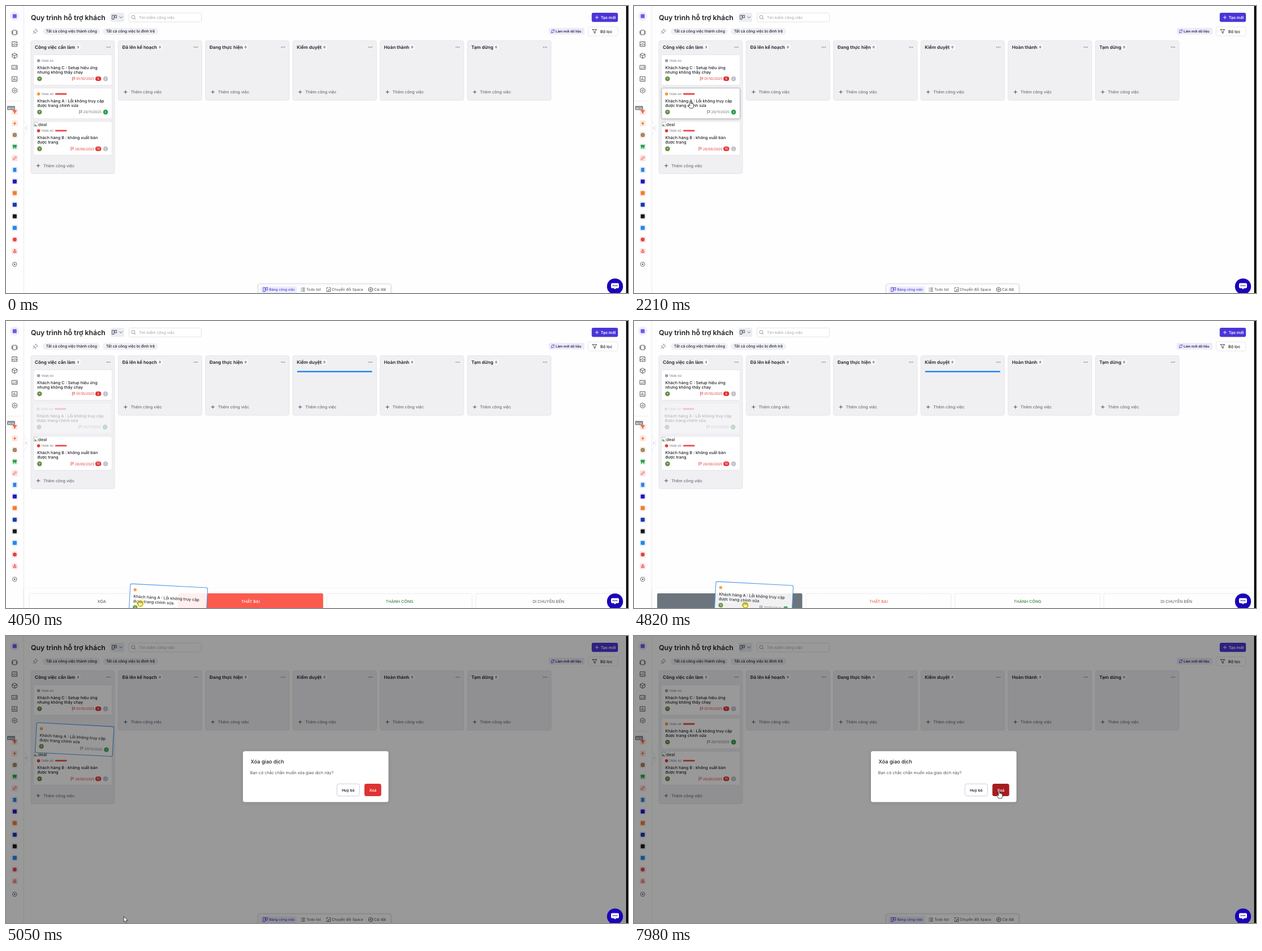
These frames come from a looping animation (1100x509 px, 8000 ms). An HTML page with a canvas:

```html
<!DOCTYPE html>
<html lang="vi">
<head>
<meta charset="utf-8">
<title>Kanban</title>
<style>
html, body { margin: 0; width: 100%; height: 100%; overflow: hidden; background: #fefefe; }
canvas { display: block; }
</style>
</head>
<body>
<canvas id="stage" width="1100" height="509"></canvas>
<script>
const ctx = document.getElementById('stage').getContext('2d');
const LOOP = 8000, GRAB = 2540, DROP = 4850, HOME = 5300;
const INK = '#1d1f24', GREY = '#6d7077', VIOLET = '#4b38d8', RED = '#e03232', CHAT = '#1a05b9';
const TILT = Math.PI / 60;

const clamp = v => Math.max(0, Math.min(1, v));
const ramp = (t, from, length) => clamp((t - from) / length);

// Smooth path through [time, x, y] points.
function along(points, t) {
  let i = 0;
  while (i < points.length - 2 && t >= points[i + 1][0]) i++;
  const a = points[i], b = points[i + 1];
  const before = points[i - 1] || a, after = points[i + 2] || b;
  const span = b[0] - a[0], u = clamp((t - a[0]) / span);
  return [1, 2].map(k => {
    const m0 = i ? (b[k] - before[k]) / (b[0] - before[0]) * span : 0;
    const m1 = after === b ? 0 : (after[k] - a[k]) / (after[0] - a[0]) * span;
    return a[k] + u * m0 + u * u * (3 * (b[k] - a[k]) - 2 * m0 - m1)
      + u * u * u * (2 * (a[k] - b[k]) + m0 + m1);
  });
}

const CURSOR = [
  [250, 1075, 498], [480, 880, 400], [760, 430, 250], [1020, 197, 184], [1250, 150, 152],
  [1500, 96, 205], [1720, 112, 238], [1930, 104, 220], [2210, 99.5, 169], [GRAB, 99.5, 170],
  [2680, 76, 200], [2850, 300, 288], [3020, 529, 356], [3250, 580, 390], [3450, 588, 425],
  [3650, 530, 460], [3850, 390, 492], [4050, 238, 501], [4250, 197, 504], [DROP, 197, 504],
  [4910, 198, 504], [5050, 208, 498], [5300, 350, 430], [5560, 590, 350], [5850, 644, 321],
  [6150, 648, 277], [6600, 647, 274], [6720, 642, 274], [6930, 604, 273], [7140, 604, 275],
  [7400, 643, 274], [7640, 646, 276], [7840, 646, 275], [7980, 645.5, 275.5]
];
const DRAG = [
  [GRAB, 118, 172.7], [2690, 92, 186], [2850, 262, 245], [3020, 512, 315], [3250, 567, 368],
  [3450, 581, 412], [3650, 556, 448], [3850, 440, 480], [4050, 287.5, 496], [4250, 224, 499],
  [DROP, 212, 492]
];

function text(str, x, cy, size, color = INK, weight = 400, align = 'left') {
  ctx.font = `${weight} ${size}px Inter, sans-serif`;
  ctx.textAlign = align;
  ctx.fillStyle = color;
  ctx.fillText(str, x, cy + size * 0.364);
  return ctx.measureText(str).width;
}

function box(x, y, w, h, r, fill, stroke, width = 0.8) {
  ctx.beginPath();
  ctx.roundRect(x, y, w, h, r);
  if (fill) { ctx.fillStyle = fill; ctx.fill(); }
  if (stroke) { ctx.strokeStyle = stroke; ctx.lineWidth = width; ctx.stroke(); }
}

function disc(x, y, r, fill, stroke, width = 0.8) {
  box(x - r, y - r, 2 * r, 2 * r, r, fill, stroke, width);
}

function path(x, y, d, stroke, width = 0.9, fill) {
  const shape = new Path2D(d);
  ctx.save();
  ctx.translate(x, y);
  if (fill) { ctx.fillStyle = fill; ctx.fill(shape); }
  if (stroke) {
    ctx.strokeStyle = stroke;
    ctx.lineWidth = width;
    ctx.lineJoin = ctx.lineCap = 'round';
    ctx.stroke(shape);
  }
  ctx.restore();
}

function shadow(blur, color, draw) {
  ctx.save();
  ctx.shadowBlur = blur;
  ctx.shadowColor = color;
  ctx.shadowOffsetY = 0.6;
  draw();
  ctx.restore();
}

const plus = (x, y, color, r = 2.7) => path(x, y, `M${-r} 0H${r}M0 ${-r}V${r}`, color, 0.9);
const boardIcon = (x, y, color) => path(x, y, 'M-3.8-3.6H-.8V3.6H-3.8ZM1-3.6H3.8V1H1Z', color, 0.9);
const gear = (x, y, color, s = 1) => {
  path(x, y, `M0 ${-4.5 * s}L${4 * s} ${-2.3 * s}V${2.3 * s}L0 ${4.5 * s}L${-4 * s} ${2.3 * s}V${-2.3 * s}Z`, color);
  disc(x, y, 1.5 * s, null, color);
};

const MENU = [
  'M-3-4H3V4H-3ZM-4.7-2.5V2.5M4.7-2.5V2.5',
  'M-4.2-4.2H4.2V4.2H-4.2ZM-4.2 1H-1.5L0 2.3 1.5 1H4.2M-1.5-1.7L0-.3 2-2.5',
  'M0-4.5L4.3-2.2V2.3L0 4.6-4.3 2.3V-2.2ZM-4.3-2.2L0 0 4.3-2.2M0 0V4.6',
  'M-4.6-3.5H4.6V3.5H-4.6ZM-3 1.7Q-1.5-.2 0 1.7M1.5-1H3.2M1.5 1H3.2M-1.5-1.5V-1',
  'M-4.2-4.2H4.2V4.2H-4.2ZM-2 2V-.5M0 2V-2M2 2V.7'
];
const APPS = [
  ['#fde7de', '#ee5a36', 'M-3.2-2.8H3.2V-.6H1.2V3H-1.2V-.6H-3.2Z'],
  ['#fde9de', '#f06a34', 'M.8-3.8L-2.8.7H-.3L-.9 3.8 2.8-.8H.3Z'],
  ['#f8eadb', '#77502b', 'globe'],
  ['#dff3e3', '#2b9a4b', 'M-3.5-3.2H3.5V0H2.8V3.3H.9V1H-.9V3.3H-2.8V0H-3.5Z'],
  ['#fde3e1', '#e95c52', 'link'],
  ['#deecfc', '#3181df', 'M-2.8-3.6H2.8V3.6H-2.8Z'],
  ['#e1e2fb', '#2515bd', 'square'],
  ['#fde6d8', '#ee7e37', 'square'],
  ['#dfe4fa', '#1e3ba5', 'square'],
  ['#e5e5e7', '#17181b', 'square'],
  ['#dcecfd', '#2b88e5', 'square'],
  ['#fde2e1', '#de4442', 'disc'],
  ['#fde6e6', '#e95151', 'M-1.3-3.2H1.3V-.9H-1.3ZM-3.6-.3H3.6V.6H-3.6ZM-2.8 1.4H2.8V3H-2.8Z']
];

function sidebar() {
  ctx.fillStyle = '#e7e8ec';
  ctx.fillRect(31, 0, 0.9, 509);
  disc(15.3, 18, 8, '#eeedf8');
  box(11.8, 14.5, 7, 7, 1, '#7158e8');
  MENU.forEach((d, i) => path(15.3, 47 + i * 20.6, d, '#44484f', 0.9));
  gear(15.3, 150, '#44484f');
  ctx.fillStyle = '#e7e8ec';
  ctx.fillRect(0, 168.5, 27, 0.8);
  APPS.forEach(([tint, color, shape], i) => {
    const y = 187.6 + i * 20.6;
    box(10, y - 5.4, 10.8, 10.8, 2.5, tint);
    if (shape === 'square') box(11.9, y - 3.5, 7, 7, 1.3, color);
    else if (shape === 'disc') disc(15.4, y, 3.4, color);
    else if (shape === 'globe') {
      disc(15.4, y, 3.5, color);
      path(15.4, y, 'M-3-1H3M-3 1H3M-1-3V3M1-3V3', tint, 0.45);
    } else if (shape === 'link') {
      path(15.4, y, 'M-.3-1.6L1-2.9Q3.3-3 3 -.8L1.6.5M.3 1.6L-1 2.9Q-3.3 3-3 .8L-1.6-.5M-1 1L1-1', color);
    } else path(15.4, y, shape, null, 0, color);
  });
  box(2, 177.3, 14, 7.2, 1, '#858a91');
  text('BETA', 9, 181, 4.2, '#fff', 600, 'center');
  disc(15.3, 458, 3.8, null, '#44484f');
  disc(15.3, 458, 1.2, '#44484f');
  path(32, 216.5, 'M0-12Q1-8 4-7Q6-6 6-3V3Q6 6 4 7Q1 8 0 12', '#e7e8ec', 0.8, '#fff');
  path(35, 216.5, 'M-.8-1.8L.9 0-.8 1.8', '#8b8f97', 0.7);
}

function header() {
  text('Quy trình hỗ trợ khách', 43.9, 20.3, 12.3, INK, 600);
  box(185, 12, 24, 16.3, 3, '#ecedf3');
  boardIcon(191.8, 20, '#3b4050');
  path(203.3, 20, 'M-2.5-1.2L0 1.3 2.5-1.2', '#555b68');
  box(217.5, 12.3, 128, 16, 3, '#fff', '#dadce2');
  disc(225, 19.6, 3, null, '#7d828a');
  path(227.2, 21.8, 'M0 0L1.8 1.8', '#7d828a');
  text('Tìm kiếm công việc', 235, 20.4, 6.9, '#a0a3aa');
  box(1035.8, 12, 46.4, 16.2, 3, '#4a35d7');
  plus(1045, 20.2, '#fff');
  text('Tạo mới', 1051.7, 20.4, 7, '#fff', 600);

  path(52, 45, 'M.6-4L4-.6 2.6-.2.6 1.8.2 3.6-3.6-.2-1.8-.6.2-2.6ZM-1.7 1.7L-4 4', '#666b74', 0.8);
  box(65, 39, 101, 12, 6, '#efeff6');
  text('Tất cả công việc thành công', 70.8, 45, 6.68, INK, 500);
  box(171, 39, 98, 12, 6, '#efeff6');
  text('Tất cả công việc bị đình trệ', 177, 45, 6.68, INK, 500);
  box(960, 38.8, 63, 11.8, 2, '#ecebf8');
  path(967, 44.8, 'M-2.6-.4A2.7 2.7 0 0 1 2.2-1.5M2.4-3V-1.4H.8M2.6.4A2.7 2.7 0 0 1-2.2 1.5M-2.4 3V1.4H-.8', VIOLET, 0.8);
  text('Làm mới dữ liệu', 972, 44.8, 6, '#272151', 600);
  box(1029.5, 37, 52.5, 16, 3, '#fff', '#dfe1e6');
  path(1041, 45, 'M-3.7-3.4H3.7L1 .1V3.4L-1 2.5V.1Z', '#30343b', 0.9);
  text('Bộ lọc', 1051, 45, 7.22, INK, 500);
}

const COLUMNS = ['Công việc cần làm', 'Đã lên kế hoạch', 'Đang thực hiện', 'Kiểm duyệt', 'Hoàn thành', 'Tạm dừng'];
const columnX = i => 44 + i * 154.4;

function columns() {
  COLUMNS.forEach((name, i) => {
    const x = columnX(i), foot = i ? 152.5 : 283.2;
    box(x, 61.6, 148, i ? 105.6 : 235.8, 3, '#f0f0f3', '#e0e1e5');
    const end = x + 7 + text(name, x + 7, 73, 8.02, INK, 600);
    disc(end + 5.2, 72.8, 4.6, '#fff');
    text(i ? '0' : '3', end + 5.2, 72.8, 5.8, INK, 500, 'center');
    for (let k = -1; k <= 1; k++) disc(x + 137.2 + k * 2.7, 73, 0.7, '#3c4048');
    plus(x + 13, foot, '#3c4048');
    text('Thêm công việc', x + 22, foot, 7.22, GREY, 500);
  });
}

const CARDS = [
  { top: 86.5, h: 54, task: 'TASK-43', dot: '#9da0a6', lines: ['Khách hàng C : Setup hiệu ứng', 'nhưng không thấy chạy'], date: '01/10/2025', late: '5' },
  { top: 145.5, h: 54.4, task: 'TASK-40', dot: '#f39a36', bar: true, lines: ['Khách hàng A : Lỗi không truy cập', 'được trang chỉnh sửa'], date: '20/11/2025' },
  { top: 204.7, h: 60, task: 'TASK-42', dot: '#e83b3b', bar: true, alt: true, lines: ['Khách hàng B : không xuất bản', 'được trang'], date: '26/09/2025', late: '10' }
];
const CARD_X = 48.6, CARD_W = 139;

function cardBody(card, lifted) {
  const shift = card.alt ? 6 : 0, foot = 42.6 + shift;
  disc(9, 10.5 + shift, 2.8, card.dot);
  if (!lifted) {
    text(card.task, 13.7, 10.6 + shift, 5, '#85888f', 600);
    if (card.bar) box(38.3, 9.1 + shift, 20.6, 2.8, 1.4, '#ef4747');
  }
  if (card.alt) {
    box(1, 1.4, 6.5, 7.4, 0.5, '#fff', '#9fa2a7', 0.6);
    path(1.8, 8, 'M0 0V-2L1.8-3 4.2 0Z', null, 0, '#59a058');
    text('deal', 8.3, 5.3, 7.8, '#222');
  }
  card.lines.forEach((line, i) => text(line, 6.6, 22.5 + shift + i * 8.6, 7.22, INK, 500));
  disc(10.7, foot, 4.2, '#638c41');
  box(9, foot - 1.3, 3.4, 0.9, 0, '#d3dfbd');
  box(10.3, foot - 1.3, 0.8, 2.8, 0, '#d3dfbd');
  const color = card.late ? '#e14343' : '#697078', right = card.late ? 107.8 : 120;
  const left = right - text(card.date, right, foot, 6.15, color, 400, 'right');
  path(left - 6.8, foot, 'M0 3.3V-3.2M1-2.4H4.6L3.7-1 4.6.4H1', color, 0.8);
  if (card.late) {
    box(109.4, foot - 4, 10.4, 8, 4, RED);
    text(card.late, 114.6, foot, 5.4, '#fff', 500, 'center');
  }
  disc(127.5, foot, 4.3, card.late ? '#c0c2c9' : '#2c9c49');
  path(127.5, foot, 'M-.7-1.5L.9 0-.7 1.5', '#fff', 0.8);
}

function cardAt(card, hover) {
  ctx.save();
  ctx.translate(CARD_X, card.top);
  const frame = () => box(0, 0, CARD_W, card.h, 3, '#fff', hover ? '#c2c3c7' : '#e2e3e7', hover ? 1 : 0.8);
  if (hover) shadow(3, 'rgba(0,0,0,.18)', frame); else frame();
  cardBody(card);
  ctx.restore();
}

function ghost(card) {
  ctx.save();
  ctx.globalAlpha = 0.28;
  ctx.translate(CARD_X - 0.9, card.top);
  box(0, 0, CARD_W, card.h, 3, '#fff', '#e2e3e7');
  cardBody(card);
  ctx.restore();
}

function liftedCard(t) {
  const card = CARDS[1];
  let [x, y] = along(DRAG, t);
  if (t > DROP) {
    const rest = Math.pow(1 - ramp(t, DROP, HOME - DROP), 5.7);
    x = 118 + (x - 118) * rest;
    y = 172.7 + (y - 172.7) * rest;
  }
  const lift = ramp(t, GRAB, 120);
  ctx.save();
  ctx.translate(x, y);
  ctx.rotate(TILT * lift);
  ctx.scale(1 - 0.015 * lift, 1 - 0.025 * lift);
  ctx.translate(-CARD_W / 2, -card.h / 2);
  ctx.globalAlpha = 0.9;
  box(0, 0, CARD_W, card.h, 3, '#fff', '#3c8ee6', 1.1);
  cardBody(card, true);
  ctx.restore();
}

// Grows in over 130 ms, shrinks away after its end.
function dropLine(column, t, from, to) {
  const p = Math.min(ramp(t, from, 130), 1 - ramp(t, to, 90));
  if (p <= 0) return;
  const w = 133 * (0.6 + 0.4 * p);
  ctx.save();
  ctx.globalAlpha = 0.3 + 0.7 * p;
  box(columnX(column) + 74 - w / 2, 88.4, w, 2.6, 1.2, '#1e88f3');
  ctx.restore();
}

const ACTIONS = [
  ['XÓA', '#5f646b', '#6c757d', 4090, DROP],
  ['THẤT BẠI', '#f06a51', '#fb5b4e', 3720, 4090],
  ['THÀNH CÔNG', '#3f8544', '#43a047', 0, 0],
  ['DI CHUYỂN ĐẾN', '#6d7279', '#6d7279', 0, 0]
];

function actionBar(t) {
  ctx.save();
  ctx.translate(0, 36 * (1 - ramp(t, GRAB, 140)));
  shadow(5, 'rgba(0,0,0,.08)', () => box(32, 474, 1065, 50, 0, '#fefefe'));
  ACTIONS.forEach(([name, color, active, from, to], i) => {
    const x = 41 + i * 263.3;
    const on = from && Math.min(ramp(t, from, 80), 1 - ramp(t, to, 60));
    ctx.setLineDash([1.6, 1.4]);
    box(x, 483.3, 256.5, 40, 2, null, '#c9cbd0', 0.7);
    ctx.setLineDash([]);
    if (on) {
      ctx.globalAlpha = on;
      box(x, 483, 256.5, 40, 2, active);
      ctx.globalAlpha = 1;
    }
    text(name, x + 128.3, 497.8, 7.1, on > 0.5 ? '#fff' : color, 500, 'center');
  });
  ctx.restore();
}

function bottomNav() {
  shadow(3, 'rgba(0,0,0,.16)', () => box(446, 492.7, 235, 30, 3, '#fff', '#dfe0e5'));
  box(450, 497, 64.5, 16, 2, '#eceefb');
  boardIcon(459, 503, VIOLET);
  text('Bảng công việc', 465.5, 503, 6.2, VIOLET, 500);
  path(525, 503, 'M-3-2.8H-2.4M-3 0H-2.4M-3 2.8H-2.4M-.5-2.8H3.3M-.5 0H3.3M-.5 2.8H3.3', '#41464e', 1.1);
  text('Todo list', 531.2, 503, 6.4, '#41464e');
  path(570.5, 503, 'M-3.4-1V-3.4H-1M1-3.4H3.4V-1M-3.4 1V3.4H-1M0 0H3.4V3.4H0Z', '#41464e', 0.8);
  text('Chuyển đổi Space', 576.3, 503, 6.4, '#41464e');
  gear(645, 503, '#41464e', 0.88);
  text('Cài đặt', 651, 503, 6.4, '#41464e');
}

function dialog(t, hover) {
  const p = ramp(t, 4876, 150), q = Math.pow(p, 1.5);
  if (!p) return;
  ctx.fillStyle = `rgba(0,0,0,${0.4 * p})`;
  ctx.fillRect(0, 0, 1100, 509);
  ctx.save();
  ctx.globalAlpha = q;
  ctx.translate(547.7, 249.4);
  ctx.scale(0.85 + 0.15 * q, 0.85 + 0.15 * q);
  ctx.translate(-547.7, -249.4);
  shadow(6, 'rgba(0,0,0,.15)', () => box(419, 204.3, 257.4, 90.2, 3.5, '#fff'));
  text('Xóa giao dịch', 432.5, 223, 9.17, INK, 500);
  text('Bạn có chắc chắn muốn xóa giao dịch này?', 431.7, 242.2, 7.22, '#4c5057');
  box(585.2, 262.2, 40, 21.6, 3.5, hover === 'cancel' ? '#f0f0f4' : null, '#cdcedb', 1);
  text('Huỷ bỏ', 605.2, 273.2, 6.6, INK, 600, 'center');
  box(633.8, 262, 29.8, 22, 3.5, hover === 'delete' ? '#a51d20' : RED);
  text('Xoá', 648.8, 273.2, 6.6, '#fff', 600, 'center');
  ctx.restore();
}

function chat() {
  disc(1077, 497.4, 14.2, CHAT);
  path(1077, 496.5, 'M-5-5H5Q7-5 7-3V2Q7 4 5 4H2L0 6-2 4H-5Q-7 4-7 2V-3Q-7-5-5-5Z', null, 0, '#fff');
  for (let k = -1; k <= 1; k++) disc(1077 + k * 3.2, 496, 1, CHAT);
}

function pointer(kind, x, y) {
  if (kind === 'grab') {
    disc(x, y, 6.6, 'rgba(250,240,60,.85)');
    path(x, y, 'M-4.2.8L-5.3-1Q-4.8-2.2-3.5-1L-3.3-3.4Q-2.4-4.6-1.6-3.4Q-.8-5.4.4-3.8Q1.6-4.9 2.2-3.2Q3.7-3.9 3.9-2L4 1Q3.8 4.5 1.5 4.8H-1Q-3 4.4-4.2.8ZM-1.6-3.4V-.8M.4-3.8V-.8M2.2-3.2V-.8', '#55501c', 0.7, '#fff6a0');
  } else if (kind === 'hand') {
    path(x, y, 'M-1 .2Q0-.9 1 .2V4.2Q2-.0 2.9 4.4Q4-.0 4.6 4.9Q6 4 6 6V8.6Q5.8 10.5 4.8 12.4H-.8L-3.8 7.6Q-3.6 5.8-1 7.6Z', '#222', 0.8, '#fff');
  } else {
    path(x, y, 'M0 0V9.3L2.1 7.4 3.6 10.6 5 9.9 3.6 6.8H6.4Z', '#222', 0.75, '#fff');
  }
}

function draw(t) {
  const [cx, cy] = along(CURSOR, t);
  const dragging = t >= GRAB && t < DROP, lifted = t >= GRAB && t < HOME;
  const inside = (x, y, w, h) => cx >= x && cx <= x + w && cy >= y && cy <= y + h;
  const hoverCard = t >= 1020 && t < GRAB && CARDS.find(c => inside(CARD_X, c.top, CARD_W, c.h));
  const hoverButton = t > 5800 && (inside(633.8, 262, 29.8, 22) ? 'delete' : inside(585, 262, 40, 22) ? 'cancel' : null);

  ctx.fillStyle = '#fefefe';
  ctx.fillRect(0, 0, 1100, 509);
  sidebar();
  header();
  columns();
  CARDS.forEach((card, i) => {
    if (i !== 1 || !lifted) cardAt(card, card === hoverCard);
    else if (dragging) ghost(card);
  });
  if (dragging) {
    dropLine(1, t, 2800, 2910);
    dropLine(2, t, 2935, 3110);
    dropLine(3, t, 3150, DROP);
    actionBar(t);
  } else bottomNav();
  if (lifted) liftedCard(t);
  dialog(t, hoverButton);
  chat();
  if (t >= 250) pointer(dragging ? 'grab' : hoverCard || hoverButton ? 'hand' : 'arrow', cx, cy);
  ctx.fillStyle = '#000';
  ctx.fillRect(1096.7, 0, 3.3, 509);
}

ctx.textRendering = 'geometricPrecision';
const start = performance.now();
function tick() {
  draw((performance.now() - start) % LOOP);
  requestAnimationFrame(tick);
}
tick();
</script>
</body>
</html>
```
